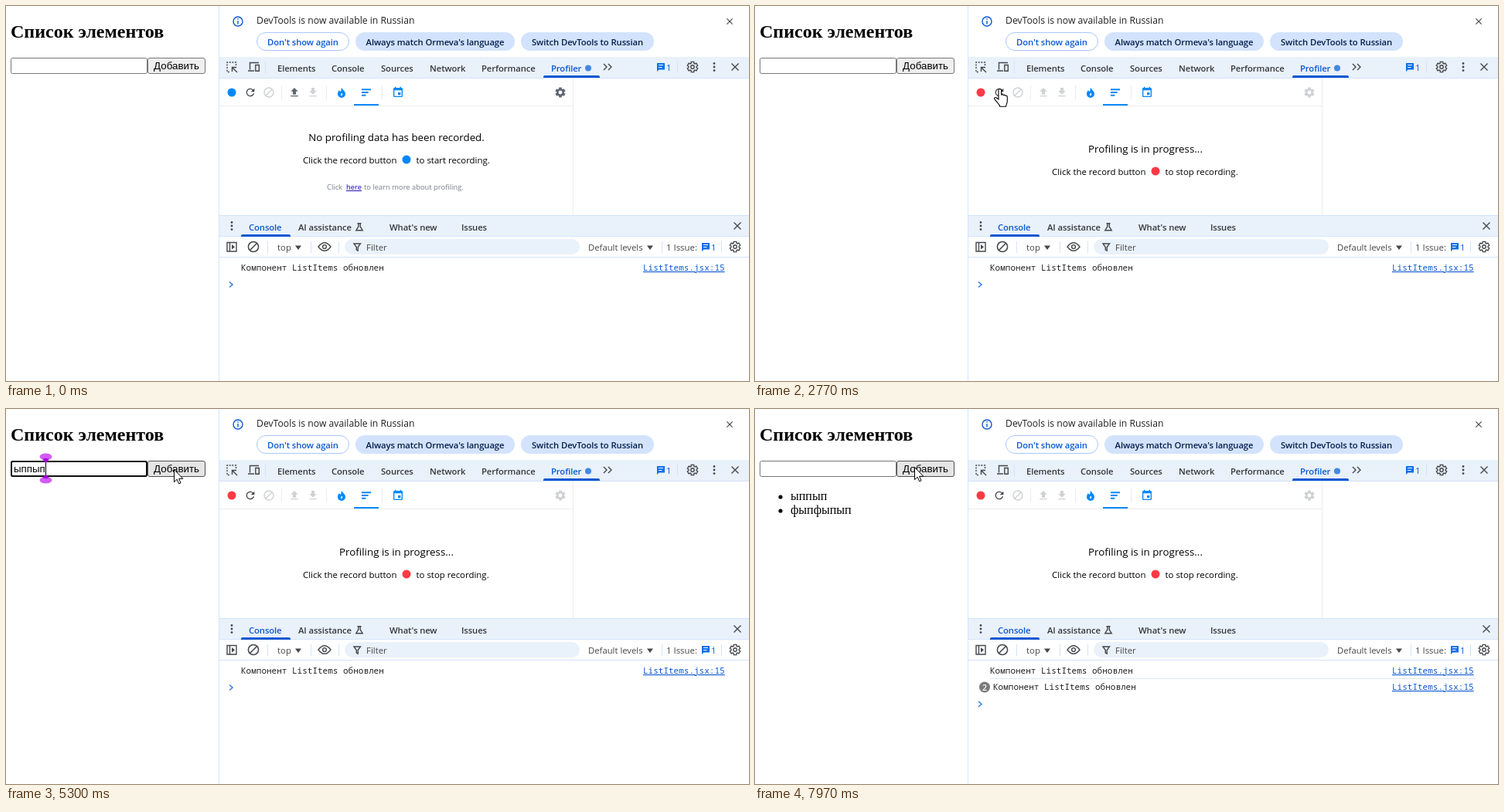
These frames come from a looping animation (961 px wide and 486 px high, 8 s). An HTML page:

```html
<!DOCTYPE html>
<html lang="ru">
<head>
<meta charset="utf-8">
<title>Список элементов</title>
<style>
  html, body { margin: 0; width: 100%; height: 100%; overflow: hidden; background: #fff; }
  svg { display: block; }
  text { font: 11.4px "Open Sans", "Noto Sans", sans-serif; fill: #1f1f1f; white-space: pre; }
  .tab { font-weight: 600; font-size: 11.3px; letter-spacing: -.01em; fill: #35383d; }
  .active { fill: #0b57d0; }
  .mid { text-anchor: middle; }
  .soft { fill: #474747; }
  .head { font-size: 13.35px; fill: #000; }
  .body { font-size: 11.45px; fill: #000; }
  .note { font-size: 9.4px; fill: #777d88; }
  .mono { font: 11px "Noto Sans Mono", monospace; }
  .link { fill: #0b57d0; text-decoration: underline; }
  .title { font: bold 24px "Liberation Serif", serif; fill: #000; }
  .item { font: 16px "Liberation Serif", serif; fill: #000; }
  .form { font: 13.333px "Liberation Sans", sans-serif; fill: #000; }
  .line { fill: none; stroke: currentColor; stroke-width: 1.4; }
  .solid { fill: currentColor; }
  .rule { fill: none; stroke: #d3e3fd; }
  .faint { fill: none; stroke: #ececec; }
  .bar { fill: #e9f1fa; }
  .blue { color: #0b57d0; }
  .azure { color: #0088fa; }
  .dark { color: #45484d; }
  .slate { color: #5f6673; }
  .off { color: #cfd1d5; }
</style>
</head>
<body>
<svg id="stage" width="961" height="486" viewBox="0 0 961 486">
  <defs>
    <g id="gear"><path id="gearLine" class="line"/><circle class="line" r="2.2"/></g>
    <path id="gearSolid" class="solid" fill-rule="evenodd"/>
    <path id="cross" class="line" d="M-4.5-4.5 4.5 4.5M4.5-4.5-4.5 4.5"/>
    <g id="dots" class="solid"><circle cy="-4.6" r="1.4"/><circle r="1.4"/><circle cy="4.6" r="1.4"/></g>
    <g id="ban" class="line"><circle r="6"/><path d="M4.3-4.3-4.3 4.3"/></g>
    <path id="more" class="line" d="M-5.5-4-1.5 0-5.5 4M.5-4 4.5 0 .5 4"/>
    <path id="drop" class="solid" d="M-4-2.4H4L0 3z"/>
    <g id="chat">
      <path fill="#0b6fe8" d="M-5-5H5V3.5H-2.5L-5 6z"/>
      <path stroke="#fff" d="M-3-2.5H3M-3 .5H1.5"/>
    </g>
    <path id="arrowUp" class="solid" d="M0-6 4.7-1.3H2V2.7H-2V-1.3H-4.7zM-4.7 4H4.7V5.3H-4.7z"/>
    <path id="arrowDown" class="solid" d="M0 2.7-4.7-2H-2V-6H2V-2H4.7zM-4.7 4H4.7V5.3H-4.7z"/>
    <path id="prompt" fill="none" stroke="#2f7de1" stroke-width="1.5" d="M289-3.5 293 0 289 3.5"/>
    <g id="row">
      <text class="mono" x="304">Компонент ListItems обновлен</text>
      <text class="mono link" x="824">ListItems.jsx:15</text>
    </g>
  </defs>

  <!-- page -->
  <text class="title" x="6" y="41">Список элементов</text>
  <rect x="6.5" y="67.5" width="176" height="20" rx="2" fill="#fff" stroke="#767676"/>
  <rect id="add" x="183.5" y="67.5" width="74" height="20" rx="2.5"/>
  <text class="form mid" x="220.5" y="82">Добавить</text>
  <rect data-on="3400-5430 6070-7830" x="7" y="68" width="175" height="19" rx="2" fill="#fff" stroke="#101010" stroke-width="2"/>
  <text id="field" class="form" x="10" y="82"></text>
  <path id="caret" stroke="#000" d="M.5 70V85"/>
  <g id="marker">
    <path fill="#d05cf6" d="M-8 62a8 4.6 0 0 1 16 0Q7 65.5 0 67-7 65.5-8 62zM-8 92a8 4.6 0 0 0 16 0Q7 88.5 0 87-7 88.5-8 92z"/>
    <path fill="#a500d4" d="M-4 65Q0 63 4 65L.5 70H-.5zM-4 89Q0 91 4 89L.5 85H-.5z"/>
  </g>
  <g data-on="5530-8000"><circle cx="33" cy="114" r="2.6"/><text class="item" x="46" y="118">ыппып</text></g>
  <g data-on="7970-8000"><circle cx="33" cy="132" r="2.6"/><text class="item" x="46" y="136">фыпфыпып</text></g>
  <path class="rule" d="M275.5 0V486"/>

  <!-- info bar -->
  <g class="blue">
    <circle class="line" cx="300" cy="20" r="6"/>
    <path class="line" d="M300 19V23.5M300 16V17.6"/>
  </g>
  <text x="324" y="23" style="font-size:12.2px">DevTools is now available in Russian</text>
  <use href="#cross" transform="translate(936 20) scale(.82)" class="dark"/>
  <rect x="324.5" y="34.5" width="119" height="23" rx="11.5" fill="#fff" stroke="#a8c7fa"/>
  <rect x="452" y="34" width="206" height="24" rx="12" fill="#d3e3fd"/>
  <rect x="666" y="34" width="172" height="24" rx="12" fill="#d3e3fd"/>
  <text class="tab mid active" x="384" y="51">Don't show again</text>
  <text class="tab mid" x="555" y="51" style="fill:#041e49">Always match Ormeva's language</text>
  <text class="tab mid" x="752" y="51" style="fill:#041e49">Switch DevTools to Russian</text>

  <!-- main tabs -->
  <rect class="bar" x="276" y="66" width="685" height="27"/>
  <path class="rule" d="M276 93.5H961M335.5 72V87M868.5 72V87"/>
  <g class="dark">
    <path class="line" stroke-dasharray="2 1.6" d="M297.5 77V73H286V85.5H290"/>
    <path class="line" d="M292.5 85V79.5H298M293 80 299 86"/>
    <path class="line" d="M327 73.5H315.5V82.5M313 84H321M322.8 76.5H327.3V84.3H322.8z"/>
    <use href="#gear" x="888" y="79"/>
    <use href="#dots" x="916" y="79"/>
    <use href="#cross" x="943" y="79"/>
  </g>
  <text class="tab" x="351" y="85">Elements</text>
  <text class="tab" x="421" y="85">Console</text>
  <text class="tab" x="485" y="85">Sources</text>
  <text class="tab" x="548" y="85">Network</text>
  <text class="tab" x="615" y="85">Performance</text>
  <g data-on="1900-2300"><text class="tab" x="705" y="85">Memory</text></g>
  <g id="profiler">
    <text class="tab active" x="705" y="85">Profiler</text>
    <circle cx="753" cy="80.5" r="4" fill="#4388e2"/>
    <path fill="#0b57d0" d="M695 93V92Q695 90 697 90H766Q768 90 768 92V93z"/>
    <use href="#more" x="778.5" y="79" class="dark"/>
  </g>
  <g data-on="0-1900 2300-8000">
    <use href="#chat" x="847" y="79"/>
    <text x="854" y="84" class="active">1</text>
  </g>

  <!-- profiler panel -->
  <g data-on="0-1900 2430-8000">
    <path class="faint" d="M276 129.5H733.5M733.5 94V271M356.5 103V121M414.5 103V121M486.5 103V121"/>
    <path fill="#43464c" transform="translate(308 104) scale(.667)" d="M17.65 6.35A8 8 0 0 0 12 4a8 8 0 1 0 7.73 10h-2.08A6 6 0 1 1 12 6c1.66 0 3.14.69 4.22 1.78L13 11h7V4z"/>
    <use href="#ban" x="340" y="112" class="off"/>
    <use href="#arrowDown" x="397" y="112" class="off"/>
    <g class="azure">
      <path class="solid" d="M434 105.5C434.5 108 439 110 439 114A5 5 0 0 1 429 114C429 111.5 430.3 110.2 431 109 431.5 110.5 432.5 111 433 110.5 434 109.5 433.4 107 434 105.5z"/>
      <path fill="#fff" d="M434.4 112.5Q436.3 115 434 116.4 431.6 115.4 434.4 112.5z"/>
      <path class="solid" transform="translate(458 104) scale(.667)" d="M3 5H21V8H3zM3 10.5H16V13.5H3zM3 16H11V19H3z"/>
      <path class="solid" d="M450 127H482V129H450z"/>
      <path class="solid" transform="translate(499 104) scale(.667)" d="M17 12h-5v5h5zM16 1v2H8V1H6v2H5a2 2 0 0 0-2 2V19a2 2 0 0 0 2 2H19a2 2 0 0 0 2-2V5a2 2 0 0 0-2-2H18V1zM19 19H5V8H19z" fill-rule="evenodd"/>
    </g>
  </g>
  <g data-on="0-1900">
    <g class="azure"><circle class="solid" cx="292" cy="112" r="5.5"/><circle class="solid" cx="518" cy="199" r="5.5"/></g>
    <use href="#arrowUp" x="373" y="112" class="slate"/>
    <use href="#gearSolid" x="717" y="112" class="slate"/>
    <text class="head mid" x="505" y="175">No profiling data has been recorded.</text>
    <text class="body" x="384" y="204">Click the record button</text>
    <text class="body" x="530.5" y="204">to start recording.</text>
    <text class="note" x="415" y="238">Click</text>
    <text class="note" x="440" y="238" style="fill:#1a00b8;text-decoration:underline">here</text>
    <text class="note" x="463" y="238">to learn more about profiling.</text>
  </g>
  <g data-on="2430-8000">
    <g fill="#ff3a45"><circle cx="292" cy="112" r="5.5"/><circle cx="518" cy="214" r="5.5"/></g>
    <use href="#arrowUp" x="373" y="112" class="off"/>
    <use href="#gearSolid" x="717" y="112" class="off"/>
    <text class="head mid" x="505" y="190">Profiling is in progress...</text>
    <text class="body" x="384" y="219">Click the record button</text>
    <text class="body" x="530.5" y="219">to stop recording.</text>
  </g>

  <!-- drawer -->
  <rect class="bar" x="276" y="272" width="685" height="26"/>
  <path class="rule" d="M276 271.5H961M276 298.5H961M276 325.5H961M338.5 305V320M394.5 305V320M430.5 305V320M925.5 305V320"/>
  <path fill="#0b57d0" d="M304 299V298Q304 296 306 296H366Q368 296 368 298V299z"/>
  <text class="tab active" x="314" y="291">Console</text>
  <text class="tab" x="378" y="291">AI assistance</text>
  <text class="tab" x="496" y="291">What's new</text>
  <text class="tab" x="589" y="291">Issues</text>
  <g class="dark">
    <use href="#dots" x="292" y="285"/>
    <path class="line" d="M454.5 281.7H459.5M455.8 281.7V286L452.8 290.7H461.2L458.2 286V281.7"/>
    <use href="#cross" x="946" y="285"/>
    <path class="line" d="M286 306.5H298V318H286zM289.5 306.5V318"/>
    <path class="solid" d="M292 309 296 312.2 292 315.5z"/>
    <use href="#ban" transform="translate(320 312) scale(1.1)"/>
    <use href="#drop" x="378" y="313"/>
    <path class="line" d="M404 312Q412 301.5 420 312 412 322.5 404 312z"/>
    <circle class="line" cx="412" cy="312" r="2.4"/>
    <use href="#gear" x="943" y="312"/>
  </g>
  <text class="soft" x="351" y="317">top</text>
  <rect id="filter" class="bar" x="438" y="302" height="20" rx="10"/>
  <path class="line dark" d="M450 308H458.5L455.2 312.5V317L453.3 316V312.5z"/>
  <text class="soft" x="466" y="317">Filter</text>
  <g id="levels">
    <text class="soft" x="753" y="317" style="font-size:11.3px">Default levels</text>
    <use href="#drop" x="833" y="313" class="dark"/>
    <path class="rule" d="M848.5 305V320"/>
  </g>
  <g data-on="0-1900 2300-8000">
    <text class="soft" x="854" y="317">1 Issue:</text>
    <use href="#chat" x="905" y="312"/>
    <text x="912" y="317" class="active">1</text>
  </g>
  <text data-on="1900-2300" class="soft" x="867" y="317">No Issues</text>

  <!-- console -->
  <use data-on="0-1870 2100-8000" href="#row" y="343"/>
  <path data-on="5530-8000" class="rule" style="stroke:#e1e6ee" d="M304 349.5H932"/>
  <use data-on="5530-7970" href="#row" y="364"/>
  <g data-on="7970-8000">
    <circle cx="297" cy="360.5" r="7" fill="#7b7b7b"/>
    <text class="mid" x="297" y="364.5" style="fill:#fff;font-size:10.5px;font-weight:600">2</text>
    <text class="mono" x="308" y="364">Компонент ListItems обновлен</text>
    <text class="mono link" x="824" y="364">ListItems.jsx:15</text>
  </g>
  <use data-on="1870-2100" href="#prompt" y="340"/>
  <use data-on="0-1870 2100-5530" href="#prompt" y="361"/>
  <use data-on="5530-8000" href="#prompt" y="382.5"/>

  <!-- mouse pointers -->
  <g id="pointer">
    <path id="arrow" fill="#fff" stroke="#000" d="M.5.5V16.6L4.2 13.2 6.7 18.8 9 17.8 6.6 12.3H11.8z"/>
    <path id="hand" fill="#fff" stroke="#000" stroke-width="1.1" d="M1 14V2.3a1.8 1.8 0 0 1 3.6 0V8.5c.3-1.3 2.9-1.1 3 .6.3-1.2 2.6-.9 2.7.7.4-.9 2-.6 2 1v5.4c0 3-1.4 4.2-1.8 7.1H2.8C2.4 20.6-1.4 17.6-4.2 13.6c-.9-1.7 1.6-2.8 2.9-1.3z"/>
    <path id="beam" fill="none" stroke="#000" d="M-3.5-7.5H-1L.5-6.5 2-7.5H4.5M.5-6.5V6.5M-3.5 7.5H-1L.5 6.5 2 7.5H4.5"/>
  </g>
</svg>
<script>
const LOOP = 8000;
const $ = id => document.getElementById(id);
const show = (el, on) => { el.style.display = on ? '' : 'none'; };
const within = (t, spans) => spans.some(([a, b]) => t >= a && t < b);
const parse = s => s.split(' ').map(p => p.split('-').map(Number));

const timed = [...document.querySelectorAll('[data-on]')].map(el => [el, parse(el.dataset.on)]);
const reloading = [[1900, 2300]];
const focused = parse('3400-5430 6070-7830');

// six-toothed wheel
function wheel(tip, root) {
  const points = [];
  for (let a = 0; a < 360; a += 60)
    for (const [turn, r] of [[-22, root], [-15, tip], [15, tip], [22, root]]) {
      const rad = (a + turn) * Math.PI / 180;
      points.push(`${(r * Math.sin(rad)).toFixed(2)} ${(-r * Math.cos(rad)).toFixed(2)}`);
    }
  return `M${points.join('L')}z`;
}
$('gearLine').setAttribute('d', wheel(6.9, 5.1));
$('gearSolid').setAttribute('d', wheel(6.8, 5) + 'M-2.4 0a2.4 2.4 0 0 0 4.8 0 2.4 2.4 0 0 0-4.8 0z');

// [from, to, start, control, end]
const moves = [
  [430, 1230, [683, 307], [400, -95], [314, 107]],
  [2770, 3360, [314, 107], [220, 104], [116, 80]],
  [4880, 5300, [116, 80], [170, 76], [217, 78]],
  [5570, 6040, [217, 78], [165, 76], [114, 82]],
  [6340, 6370, [114, 82], [112, 82], [111, 82]],
  [7130, 7630, [111, 82], [160, 74], [207, 75]],
  [7670, 7830, [207, 75], [212, 122], [206, 75]]
];

// [time, field text]
const keys = [
  [0, ''], [4230, 'ы'], [4370, 'ып'], [4600, 'ыпп'], [4700, 'ыппы'], [4830, 'ыппып'], [5530, ''],
  [6430, 'ф'], [6480, 'фы'], [6530, 'фып'], [6830, 'фыпф'], [6900, 'фыпфы'],
  [6970, 'фыпфып'], [7040, 'фыпфыпы'], [7110, 'фыпфыпып'], [7970, '']
];

function pointerAt(t) {
  const [a, b, p, c, q] = moves.filter(m => t >= m[0]).pop() || moves[0];
  const u = Math.min(1, Math.max(0, (t - a) / (b - a)));
  const s = u * u * (3 - 2 * u), r = 1 - s;
  return [0, 1].map(i => Math.round(r * r * p[i] + 2 * r * s * c[i] + s * s * q[i]));
}

function drawPointer(t) {
  const [x, y] = pointerAt(t);
  const over = (l, top, r, b) => x >= l && x < r && y >= top && y < b;
  const beam = over(6, 67, 183, 88) || over(438, 302, 742, 322);
  const hand = over(304, 100, 328, 124) && within(t, [[1270, 1900], [2430, 3400]]);
  show($('pointer'), t >= 430);
  $('pointer').setAttribute('transform', `translate(${x} ${y})`);
  show($('beam'), beam);
  show($('hand'), hand);
  show($('arrow'), !beam && !hand);

  const hover = t >= 430 && over(183, 67, 258, 88);
  const pressed = within(t, [[5430, 5530], [7830, 7970]]);
  $('add').setAttribute('fill', pressed ? '#f5f5f5' : hover ? '#e5e5e5' : '#efefef');
  $('add').setAttribute('stroke', hover && !pressed ? '#4f4f4f' : '#767676');
}

function drawField(t) {
  const [at, text] = keys.filter(k => t >= k[0]).pop();
  const focus = focused.find(([a, b]) => t >= a && t < b);
  if ($('field').textContent !== text) $('field').textContent = text;
  const x = 10 + (text ? Math.round($('field').getComputedTextLength()) : 0);
  const since = focus ? t - Math.max(at, focus[0]) : 0;
  show($('caret'), focus && Math.floor(since / 600) % 2 === 0);
  show($('marker'), focus && text);
  $('caret').setAttribute('transform', `translate(${x} 0)`);
  $('marker').setAttribute('transform', `translate(${x + .5} 0)`);
}

function draw(t) {
  for (const [el, spans] of timed) show(el, within(t, spans));
  const wide = within(t, reloading);
  $('profiler').setAttribute('transform', `translate(${wide ? 67 : 0} 0)`);
  $('levels').setAttribute('transform', `translate(${wide ? 13 : 0} 0)`);
  $('filter').setAttribute('width', wide ? 317 : 304);
  drawField(t);
  drawPointer(t);
}

const start = performance.now();
function tick() {
  draw((performance.now() - start) % LOOP);
  requestAnimationFrame(tick);
}
tick();
</script>
</body>
</html>
```
